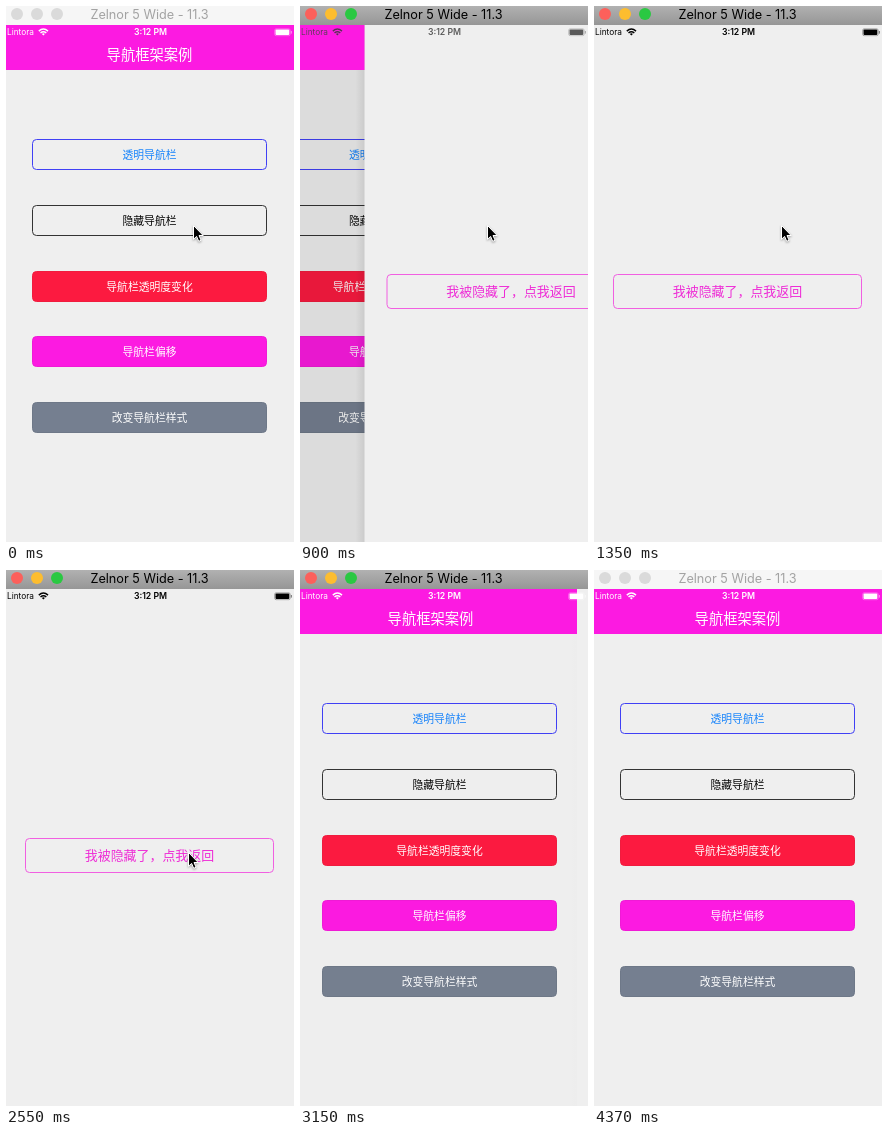
These frames come from a looping animation (288 px wide and 536 px high, 4.47 s). An HTML page:

```html
<!DOCTYPE html>
<html lang="zh-CN">
<head>
<meta charset="utf-8">
<title>导航框架案例</title>
<style>
  html, body { margin: 0; width: 100%; height: 100%; overflow: hidden; background: #efefef; }
  body { position: relative; font-family: Inter, Roboto, sans-serif; }
  div, span, svg { position: absolute; box-sizing: border-box; }

  #screen { left: -3px; top: 0; width: 293px; height: 536px;
    font-family: "Noto Sans CJK SC", "Noto Sans CJK", sans-serif; }
  .page { inset: 0; background: #efefef; }
  .btn { left: 29px; width: 235px; height: 31px; padding-bottom: 1px;
    border: 1px solid; border-radius: 4.5px; font-size: 10.8px; }
  .btn, #bar { display: flex; align-items: center; justify-content: center;
    line-height: 1; white-space: nowrap; }
  #dim { inset: 0; background: #000; }
  #shadow { left: -9px; top: 0; width: 9px; height: 100%;
    background: linear-gradient(to right, rgba(0,0,0,0), rgba(0,0,0,.1)); }
  #front .btn { left: 22px; top: 268px; width: 249px; height: 35px; padding-bottom: 0;
    border-color: #f15fe1; color: #ee2bd6; font-size: 12.95px; }
  #bar { left: 0; top: 19px; width: 293px; height: 45px; padding-top: 13px;
    background: #fc1ae1; color: #fff; font-size: 14.3px; }

  .status { left: 0; top: 19px; width: 288px; height: 15px; font-size: 8.3px; line-height: 15px; }
  .status span { white-space: nowrap; }
  .net { left: 1px; }
  .time { left: 94.5px; width: 100px; text-align: center; font-size: 8.7px; font-weight: 600; }
  .status svg { left: 0; top: 0; }

  #title { left: 0; top: 0; width: 288px; height: 19px; }
  #title span { left: 0; width: 287px; top: 0; line-height: 17px; text-align: center; font-size: 12.7px; }
  #title i { position: absolute; top: 2px; width: 12px; height: 12px; border-radius: 50%; }
  #title.on { background: linear-gradient(#b1b1b1, #969696); color: #000; }
  #title.off { background: #f6f6f6; color: #a3a3a3; }
  #title.off i { background: #dadada !important; }

  #cursor { left: 0; top: 0; overflow: visible; filter: drop-shadow(0 1px 1px rgba(0,0,0,.35)); }
</style>
</head>
<body>
<div id="screen">
  <div id="home" class="page">
    <div class="btn" style="top:133px; border-color:#4040f5; color:#1683fb">透明导航栏</div>
    <div class="btn" style="top:199px; border-color:#333; color:#000">隐藏导航栏</div>
    <div class="btn" style="top:265px; border-color:#f01c3e; background:#fc1a40; color:#fff">导航栏透明度变化</div>
    <div class="btn" style="top:330px; border-color:#f01ad6; background:#fc1ae1; color:#fff">导航栏偏移</div>
    <div class="btn" style="top:396px; border-color:#6e7888; background:#757f90; color:#fff">改变导航栏样式</div>
    <div id="dim"></div>
  </div>
  <div id="front" class="page">
    <div id="shadow"></div>
    <div class="btn">我被隐藏了，点我返回</div>
  </div>
  <div id="bar">导航框架案例</div>
</div>

<div id="light" class="status" style="color:#fff">
  <span class="net">Lintora</span><span class="time">3:12 PM</span>
  <svg width="288" height="15" fill="none" stroke="currentColor">
    <g stroke-width="1.5">
      <path d="M32.8 6.1Q37.4 1.9 42 6.1M34.5 8Q37.4 5.5 40.3 8"/>
      <path d="M35.9 8.9Q37.4 7.8 38.9 8.9L37.4 10.6Z" fill="currentColor" stroke="none"/>
    </g>
    <rect x="268.6" y="3.8" width="15.6" height="6.9" rx="1.6" stroke-width=".6" opacity=".5"/>
    <rect x="269.5" y="4.6" width="13.8" height="5.3" rx=".9" fill="currentColor" stroke="none"/>
    <path d="M285.4 6V8.6" stroke-width="1" opacity=".5"/>
  </svg>
</div>

<div id="title" class="off">
  <i style="left:5px; background:#fc605b"></i>
  <i style="left:25px; background:#fdbd2f"></i>
  <i style="left:45px; background:#2ac842"></i>
  <span>Zelnor 5 Wide - 11.3</span>
</div>

<svg id="cursor" width="12" height="18">
  <path d="M.5 .5V14.3L3.6 11.4L5.7 16.3L8.1 15.3L6 10.5H10.2Z" fill="#000" stroke="#fff" stroke-width="1" stroke-linejoin="round"/>
</svg>

<script>
  const LOOP = 4470, TICK = 150, W = 293;
  const PUSH = 740, POP = 2870, OMEGA = 0.0175;
  const $ = id => document.getElementById(id);
  const [home, dim, front, shadow, bar, light, title, cursor] =
    ["home", "dim", "front", "shadow", "bar", "light", "title", "cursor"].map($);

  const dark = light.cloneNode(true);
  dark.id = "dark";
  dark.style.color = "#000";
  light.after(dark);

  // start time, x, y of the pointer tip
  const pointer = [[0, 187, 219], [2250, 185, 244], [2400, 183, 275], [2550, 182, 282]];
  const POINTER_END = 3150;

  const clamp = v => Math.max(0, Math.min(1, v));
  const half = v => Math.round(v * 2) / 2;
  const move = (el, x, y = 0) => el.style.transform = `translate(${x}px, ${y}px)`;

  // Critically damped spring: 1 at rest, falling to 0
  function spring(ms) {
    const x = Math.max(0, ms) * OMEGA;
    return (1 + x) * Math.exp(-x);
  }

  function draw(time) {
    const t = Math.floor(time / TICK) * TICK;
    const shown = t < POP ? 1 - spring(t - PUSH) : spring(t - POP);
    const ink = t < POP ? clamp((t - PUSH) / 255) : clamp(1 - (t - POP) / 130);

    move(home, -half(W * 0.3 * shown));
    move(bar, -half(W * shown));
    move(front, half(W * (1 - shown)));
    dim.style.opacity = 0.1 * shown;
    shadow.style.opacity = shown;
    dark.style.opacity = ink;
    light.style.opacity = 1 - ink;

    title.className = time >= 750 && time < 4370 ? "on" : "off";

    const [, x, y] = pointer.filter(p => p[0] <= t).pop();
    move(cursor, x, y);
    cursor.style.visibility = t < POINTER_END ? "visible" : "hidden";
  }

  const start = performance.now();
  function frame() {
    draw((performance.now() - start) % LOOP);
    requestAnimationFrame(frame);
  }
  frame();
</script>
</body>
</html>
```
